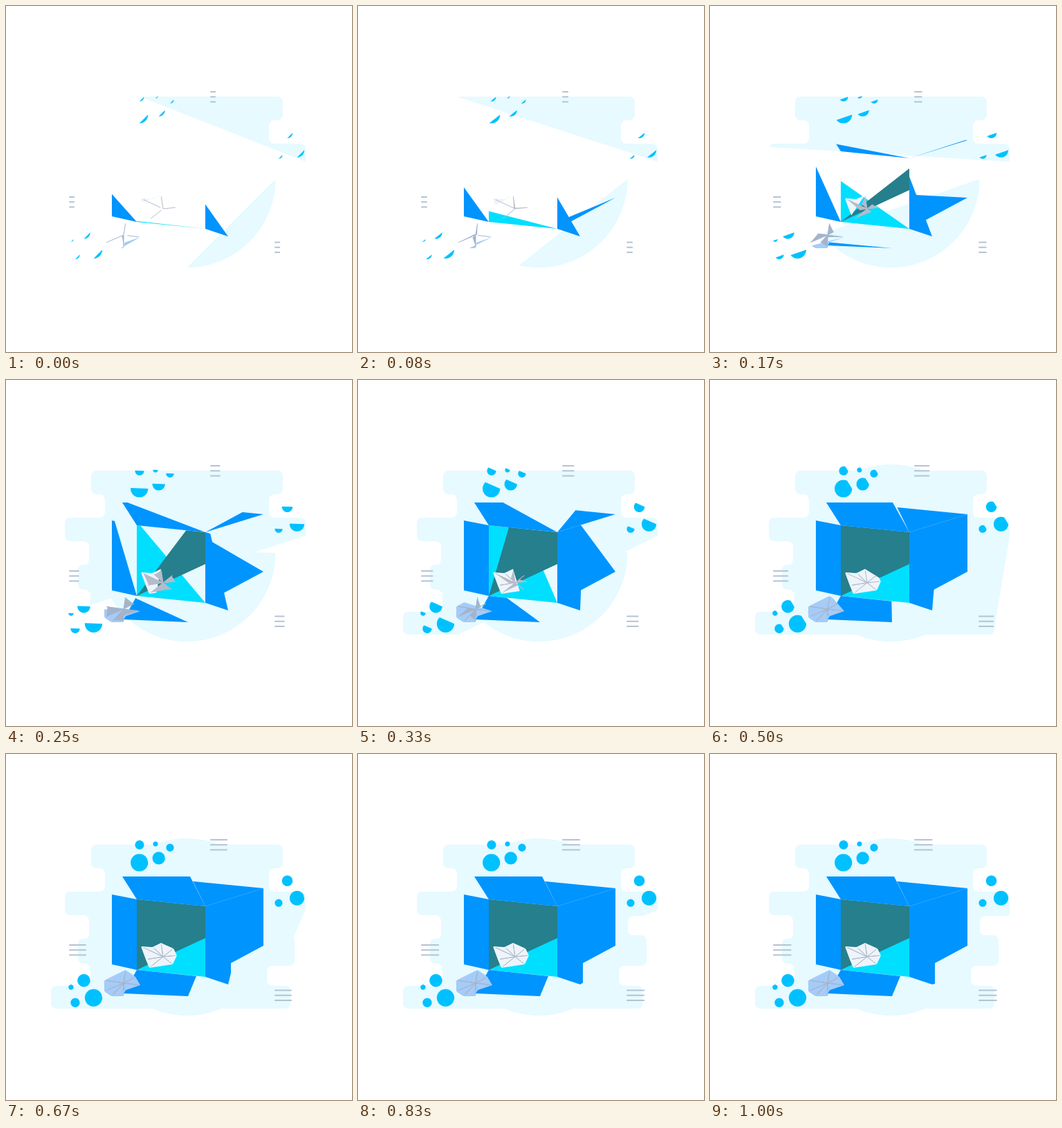
These frames come from a looping animation (500x500 px, 1.41 s). An HTML page with a canvas:

```html
<!DOCTYPE html>
<html lang="en">
<head>
<meta charset="utf-8">
<title>Open box</title>
<style>
  html, body { margin: 0; width: 100%; height: 100%; overflow: hidden; background: #fff; }
  canvas { display: block; width: 500px; height: 500px; }
</style>
</head>
<body>
<canvas id="stage" width="500" height="500"></canvas>
<script>
const ctx = document.getElementById('stage').getContext('2d');
const LOOP = 1410, LAST_STEP = 12;

const BLUE = '#0094ff', CYAN = '#00dfff', TEAL = '#257f8c';
const PALE = '#e6faff', BUBBLE = '#00c1ff', DASH = '#b4c3d4';

// Twelve steps per second, rounded to hundredths of a second
const stepTime = i => Math.round(i * 25 / 3) * 10;

// Share of every outline drawn so far: an S-curve that opens on a quarter
const ease = step =>
  Math.min(1, Math.max(.25, 1.014 / (1 + Math.exp(-.48 * (step - 2.95)))));

const dist = (a, b) => Math.hypot(b[0] - a[0], b[1] - a[1]);
const mix = (a, b, k) => [a[0] + (b[0] - a[0]) * k, a[1] + (b[1] - a[1]) * k];
const closed = list => [...list, list[0]];
const thereAndBack = list => [...list, ...list.slice(0, -1).reverse()];

// Clockwise circle that starts at its rightmost point
function circle(x, y, r) {
  const n = 96;
  return Array.from({ length: n + 1 }, (_, i) => {
    const a = i / n * 2 * Math.PI;
    return [x + r * Math.cos(a), y + r * Math.sin(a)];
  });
}

// Softens every corner except the starting point
function rounded(list, radius) {
  const out = [list[0]];
  for (let i = 1; i < list.length; i++) {
    const prev = list[i - 1], corner = list[i], next = list[(i + 1) % list.length];
    const toPrev = dist(corner, prev), toNext = dist(corner, next);
    const r = Math.min(radius, toPrev / 2, toNext / 2);
    const a = mix(corner, prev, r / toPrev), b = mix(corner, next, r / toNext);
    for (let u = 0; u <= 1; u += 1 / 8) {
      out.push(mix(mix(a, corner, u), mix(corner, b, u), u));
    }
  }
  return out;
}

// Outline of alternating vertical and horizontal moves
function stairs([x, y], ...stops) {
  const list = [[x, y]];
  stops.forEach((stop, i) => {
    if (i % 2) x = stop; else y = stop;
    list.push([x, y]);
  });
  return list;
}

// First part of a polyline, measured by length
function trim(list, share) {
  let left = share * list.slice(1).reduce((sum, p, i) => sum + dist(list[i], p), 0);
  const out = [list[0]];
  for (let i = 1; i < list.length; i++) {
    const d = dist(list[i - 1], list[i]);
    if (d >= left) return [...out, mix(list[i - 1], list[i], d ? left / d : 0)];
    out.push(list[i]);
    left -= d;
  }
  return out;
}

const shapes = [];
const add = (color, path, line = 0, fill = true) => shapes.push({ color, path, line, fill });
const panel = (color, ...corners) => add(color, closed(corners));

// Backdrop
add(PALE, closed(rounded(stairs([433, 225],
  199, 380, 165, 400, 131, 123, 165, 143, 199, 85, 233, 120, 267, 104, 303, 122,
  335, 65, 368, 411, 335, 377, 306, 417, 262, 390, 234, 433), 9)));
add(PALE, circle(261.5, 250, 128));

// Box: four corners of the opening, two at the back
const topLeft = [189, 210], topRight = [288, 220];
const lowRight = [288, 322], lowLeft = [189, 312];
const backTop = [372, 194], backLow = [372, 277];

panel(CYAN, lowRight, lowLeft, topLeft, topRight);
panel(TEAL, lowLeft, [288, 266], topRight, topLeft);
panel(BLUE, lowLeft, [153, 304], [153, 203], topLeft);
panel(BLUE, topRight, backTop, [270, 184]);
panel(BLUE, topRight, topLeft, [168, 177], [266, 177]);
panel(BLUE, [263, 350], [170, 346], lowLeft, [275, 321]);
panel(BLUE, backLow, lowRight, topRight, backTop);
panel(BLUE, [321, 333], lowRight, topRight, [325, 230], [325, 332]);

// Crumpled paper: every second facet is a crease that opens and folds shut
function paper(color, creaseColor, center, rim) {
  add(color, closed(rounded(rim, 2)));
  for (let i = 0; i < rim.length; i += 2) {
    const [a, b] = [rim[i], rim[i + 1]].map(p => mix(center, p, .88));
    add(creaseColor, thereAndBack([a, center, b]), 1);
  }
}
paper('#edf4fa', '#b4bbca', [227, 293],
  [[224, 273], [212, 279], [195, 278], [202, 297], [207, 309], [241, 304], [247, 291], [242, 281]]);
paper('#a6cbf7', '#a3b4cc', [170, 331],
  [[194, 334], [171, 342], [170, 350], [152, 350], [142, 343], [142, 327], [173, 312], [187, 322]]);

// Bubbles
const bubble = (x, y, r) => add(BUBBLE, circle(x, y, r));
function trio(x, y, size) {
  bubble(x, y, 9.2 * size);
  bubble(x + 14, y + 25, 12.6 * size);
  bubble(x - 12.5, y + 32, 6.6 * size);
}
trio(406.5, 183.3, .84);
trio(112.5, 327.3, 1);
bubble(94, 337, 3.7);
bubble(193, 131.3, 6.5);
bubble(216, 130, 3.6);
bubble(237, 135.3, 5.6);
bubble(192.7, 157, 12.6);
bubble(220.7, 150.5, 9.1);

// Three-line marks
for (const [x, y] of [[296, 124], [92, 276], [389, 341.6]]) {
  for (let i = 0; i < 3; i++) {
    const row = y + i * 7.2;
    add(DASH, [[x, row], [x + 24.7, row]], 2, false);
  }
}

ctx.lineCap = ctx.lineJoin = 'round';

function draw(share) {
  ctx.clearRect(0, 0, 500, 500);
  for (const { color, path, line, fill } of shapes) {
    ctx.beginPath();
    trim(path, share).forEach(p => ctx.lineTo(...p));
    ctx.fillStyle = ctx.strokeStyle = color;
    ctx.lineWidth = line;
    if (fill) ctx.fill();
    if (line) ctx.stroke();
  }
}

let origin = null;
function tick(now) {
  origin ??= now;
  const t = (now - origin) % LOOP;
  let step = 0;
  while (step < LAST_STEP && stepTime(step + 1) <= t) step++;
  draw(ease(step));
  requestAnimationFrame(tick);
}
draw(ease(0));
requestAnimationFrame(tick);
</script>
</body>
</html>
```
